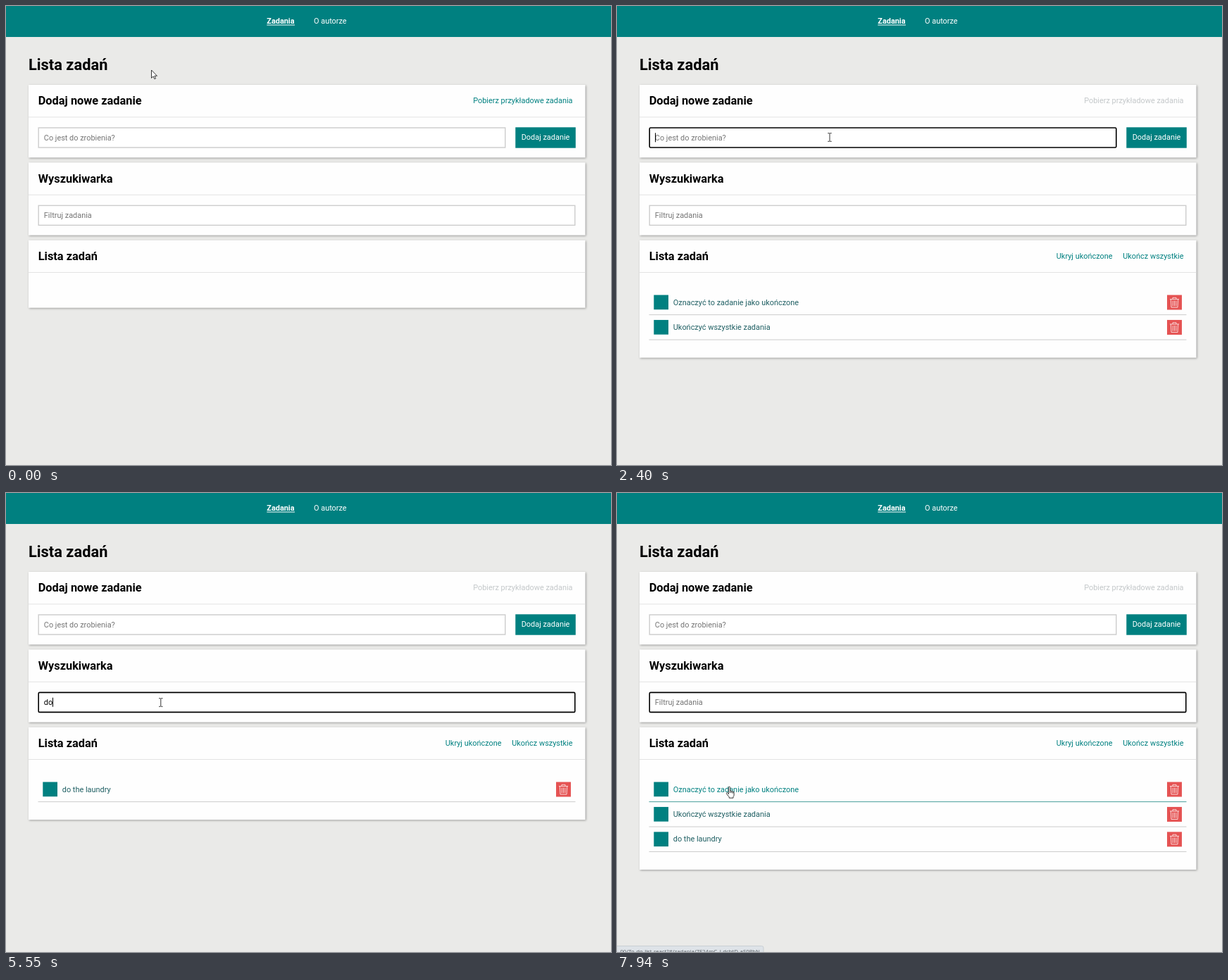
Animation, 859 px wide and 652 px high, one loop 8 s. Source, as an HTML page:

```html
<!DOCTYPE html>
<html lang="pl">
<head>
<meta charset="utf-8">
<title>Lista zadań</title>
<style>
  html, body { margin: 0; width: 100%; height: 100%; overflow: hidden; background: #eaeae8; }
  svg { display: block; font: 10.92px Roboto, sans-serif; }
  .h1 { font-size: 21.84px; font-weight: 700; }
  .h2 { font-size: 16.38px; font-weight: 700; }
  .card { fill: #fefefe; filter: drop-shadow(1.4px 1.4px 1.7px rgba(0, 0, 0, .34)); }
  .teal { fill: #008080; }
  .white { fill: #fff; }
  .muted { fill: #c4c8ca; }
  .hint { fill: #757575; }
  .task { fill: #1f5f63; }
  .end { text-anchor: end; }
  .status { font: 7.8px "Open Sans", sans-serif; fill: #555b60; text-anchor: end; }
</style>
</head>
<body>
<svg id="stage" width="859" height="652" viewBox="0 0 859 652"></svg>
<script>
const LOOP = 8000;
const stage = document.getElementById('stage');
const pen = document.createElement('canvas').getContext('2d');
pen.font = '10.92px Roboto, sans-serif';

const steps = (start, gap, n) => Array.from({ length: n }, (_, i) => start + i * gap);
const passed = (times, t) => times.filter(x => x <= t).length;
const within = (t, from, to) => t >= from && t < to;

const TASKS = ['Oznaczyć to zadanie jako ukończone', 'Ukończyć wszystkie zadania', 'do the laundry'];
const LOADING = 750, LOADED = 1290, FOCUS_ADD = 1830, SUBMIT = 3790, FOCUS_FILTER = 5000;
const ADD_KEYS = [...steps(2610, 65, 7), ...steps(3140, 78, 7)];
const FILTER_KEYS = steps(5470, 76, 6);
const FILTER_ERASE = [6310, 6370, 6430, 6490, 6600, 6710];
const CARET_TOGGLES = [FOCUS_ADD, 2120, 2400, 4180, 4320, 4560, 4790, 5290, 5470,
                       6130, 6270, 6990, 7170, 7430, 7690, 7900];
CARET_TOGGLES.splice(6, 1, 4780);
const CLICKS = [[650, 740], [1800, 1910], [FOCUS_FILTER, 5110]];

// time, x, y of the pointer's hot spot
const PATH = [[110, 206.5, 91], [640, 712.5, 141], [1000, 712.5, 141], [1080, 706, 141], [1290, 706, 141],
              [1450, 561.5, 141], [1640, 385, 162], [1800, 302, 186.5], [4320, 302, 186.5],
              [4790, 223, 297.5], [5470, 223, 297.5], [5620, 217, 297.5], [7170, 217, 297.5], [7900, 159.5, 418]];
const EASED = [110, 4320, 7170];

function pointerAt(t) {
  const next = PATH.findIndex(p => p[0] > t);
  if (next === 0) return PATH[0].slice(1);
  if (next < 0) return PATH.at(-1).slice(1);
  const [t0, x0, y0] = PATH[next - 1], [t1, x1, y1] = PATH[next];
  let k = (t - t0) / (t1 - t0);
  if (EASED.includes(t0)) k = k * k * (3 - 2 * k);
  return [x0 + (x1 - x0) * k, y0 + (y1 - y0) * k];
}

const rect = (x, y, w, h, attrs) => `<rect x="${x}" y="${y}" width="${w}" height="${h}" ${attrs}/>`;
const text = (x, y, str, cls = '') => `<text x="${x}" y="${y}" class="${cls}">${str}</text>`;

const card = (y, h, title) =>
  rect(32, y, 790.5, h, 'class="card"') +
  rect(32, y + 45.5, 790.5, 0.8, 'fill="#ddd"') +
  text(45.7, y + 28.4, title, 'h2');

function field(y, width, value, hint, focused, caret) {
  const frame = focused ? 'rx="1.5" fill="#fff" stroke="#000" stroke-width="1.6"'
                        : 'fill="#fff" stroke="#ccc" stroke-width="1.4"';
  const x = 53.8 + pen.measureText(value).width;
  return rect(46.2, y + 0.7, width - 1.4, 28, frame) +
    (value ? text(53.8, y + 18.2, value) : text(53.8, y + 18.2, hint, 'hint')) +
    (focused && caret ? rect(Math.round(x), y + 8, 1, 13, '') : '');
}

const trash = y => rect(781, y, 21, 21, 'fill="#e55353"') +
  `<path transform="translate(781 ${y})" fill="none" stroke="#fbe3e3" stroke-width=".9"
    d="M4 6H17M8 6V3.8H13V6M5.3 6L6 17.6H15L15.7 6M8.2 8V15.7M10.5 8V15.7M12.8 8V15.7"/>`;

function taskRow(name, i, hover) {
  const y = 410.5 + i * 35.45;
  return rect(52.3, y, 20.7, 20.7, 'class="teal"') +
    text(79.8, y + 14, name, hover ? 'teal' : 'task') + trash(y) +
    rect(45.5, y + 27.6, 763, 1, `fill="${hover ? '#4a9f9c' : '#ccc'}"`);
}

const SHAPES = {
  arrow: `<path fill="#fff" stroke="#222" stroke-width=".9"
    d="M0 0V11.3L2.6 8.9L4.4 12.7L6.1 11.9L4.4 8.3H8Z"/>`,
  beam: `<path fill="none" stroke="#333" stroke-width="1"
    d="M-2.7-5.8H-.7L0-5.2L.7-5.8H2.7M0-5.2V5.2M-2.7 5.8H-.7L0 5.2L.7 5.8H2.7"/>`,
  hand: `<path fill="#fff" stroke="#222" stroke-width=".9" stroke-linejoin="round"
    d="M-1.1 10V.3Q-1-.8 0-.8Q1.1-.8 1.1.3V5.2Q2.6 4.5 3.1 5.7Q4.5 5.1 5 6.4Q6.6 6 6.6 7.6
       V11.2Q6.6 12.5 5.5 13.6V15.2H-.3V13.8L-3.9 9.4Q-4.4 8.2-3.4 7.7Q-2.4 7.4-1.1 9.2M1.1 5.2V8M3.1 5.7V8.2M5 6.4V8.6"/>`
};

function scene(t) {
  const [x, y] = pointerAt(t);
  const caret = passed(CARET_TOGGLES, t) % 2 === 1;
  const draft = t < SUBMIT ? TASKS[2].slice(0, passed(ADD_KEYS, t)) : '';
  const query = 'do the'.slice(0, passed(FILTER_KEYS, t) - passed(FILTER_ERASE, t));
  const known = t < LOADED ? [] : TASKS.slice(0, t < SUBMIT ? 2 : 3);
  const shown = known.filter(name => name.includes(query));

  const onTask = t > 7170 && y > 411 && y < 432;
  const onLink = t < LOADING && x > 663 && y > 125;
  const inField = x > 45 && x < 709 && (within(y, 172, 202) || within(y, 283, 312));
  const shape = onTask || onLink ? 'hand' : inField ? 'beam' : 'arrow';
  const loading = within(t, LOADING, LOADED);

  return rect(0, 0, 859, 44, 'class="teal"') +
    `<text x="370.3" y="24.5" class="white" font-weight="700">Zadania</text>` +
    rect(370.3, 26.5, 39.7, 1, 'class="white"') +
    text(437, 24.5, 'O autorze', 'white') +
    text(32, 91.4, 'Lista zadań', 'h1') +

    card(112, 103.3, 'Dodaj nowe zadanie') +
    text(804.5, 137.5, loading ? 'Ładowanie...' : 'Pobierz przykładowe zadania',
      'end ' + (t < LOADING ? 'teal' : 'muted')) +
    field(172.3, 664, draft, 'Co jest do zrobienia?', within(t, FOCUS_ADD, FOCUS_FILTER), caret) +
    rect(723.3, 172.3, 85.5, 29.4, 'class="teal"') +
    text(731.7, 190.4, 'Dodaj zadanie', 'white') +

    card(222.3, 103.3, 'Wyszukiwarka') +
    field(282.7, 763, query, 'Filtruj zadania', t >= FOCUS_FILTER, caret) +

    card(332.7, 96 + shown.length * 35.45, 'Lista zadań') +
    (known.length ? text(703.5, 358.5, 'Ukryj ukończone', 'teal end') +
                    text(804.5, 358.5, 'Ukończ wszystkie', 'teal end') : '') +
    shown.map((name, i) => taskRow(name, i, onTask && i === 0)).join('') +

    (onTask ? rect(-3, 643.5, 211, 14, 'rx="2.5" fill="#dee3e8" stroke="#c3c9ce" stroke-width=".8"') +
              text(203, 653.5, '00/To-do-list-react?#/zadania/7F24mC_I-dcbtD-aS0PhN', 'status') : '') +
    (CLICKS.some(([from, to]) => within(t, from, to))
      ? `<circle cx="${x - 1}" cy="${y}" r="8" fill="#ff0" fill-opacity=".55"/>` : '') +
    `<g transform="translate(${x.toFixed(1)} ${y.toFixed(1)})">${SHAPES[shape]}</g>`;
}

let last = '';
function tick() {
  const markup = scene(performance.now() % LOOP);
  if (markup !== last) stage.innerHTML = last = markup;
  requestAnimationFrame(tick);
}
tick();
</script>
</body>
</html>
```
